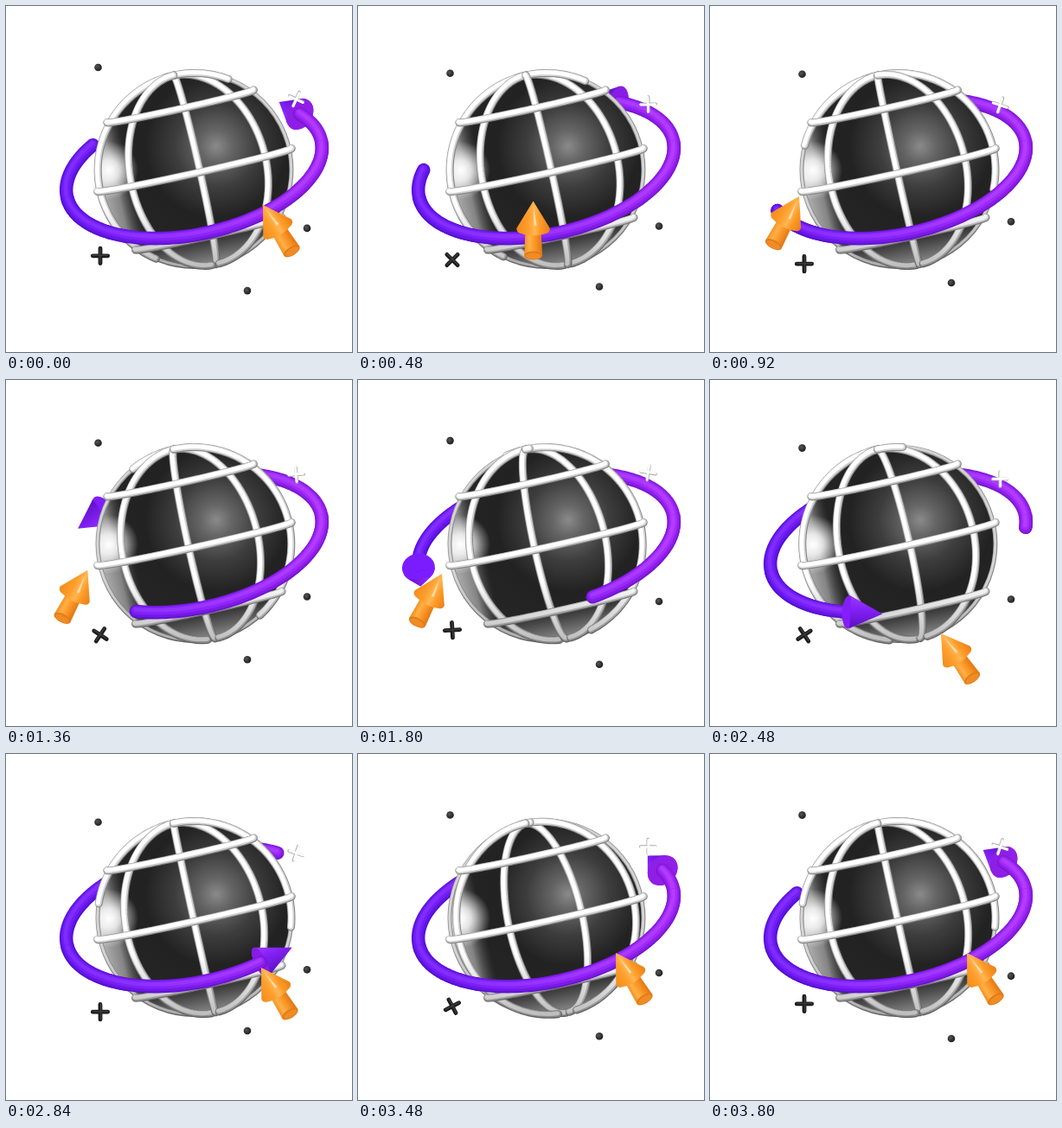
An HTML page with a canvas for the animation above (4 s loop, 400 by 400 pixels).

```html
<!DOCTYPE html>
<html lang="en">
<head>
<meta charset="utf-8">
<title>Spinning globe</title>
<style>
  html, body { margin: 0; width: 100%; height: 100%; overflow: hidden; background: #fff; }
  canvas { display: block; width: 400px; height: 400px; }
</style>
</head>
<body>
<canvas id="stage" width="400" height="400"></canvas>
<script>
const ctx = document.getElementById('stage').getContext('2d');
const { sin, cos, PI, hypot, atan2, abs } = Math;
const TAU = 2 * PI, RAD = PI / 180;
const LOOP = 4000, LAST = 3800, STEP = 40, CYCLE = 1920;
const CX = 218, CY = 189.5, R = 112;
const TILT = 12.5 * RAD, NOD = 2 * RAD;
const RING_X = 217.5, RING_Y = 188.3, RING = 150.5, SQUASH = 0.5, SPAN = 252;

// Smooth monotone interpolation through [time, value] keys
function track(keys) {
  const slope = i => (keys[i + 1][1] - keys[i][1]) / (keys[i + 1][0] - keys[i][0]);
  const tangent = i => {
    if (i === 0 || i === keys.length - 1) return 0;
    const a = slope(i - 1), b = slope(i);
    return a * b <= 0 ? 0 : 2 * a * b / (a + b);
  };
  return t => {
    let i = 0;
    while (i < keys.length - 2 && t > keys[i + 1][0]) i++;
    const [t0, v0] = keys[i], [t1, v1] = keys[i + 1], d = t1 - t0;
    const s = Math.min(1, (t - t0) / d), q = 1 - s;
    return v0 * (1 + 2 * s) * q * q + v1 * s * s * (3 - 2 * s)
      + d * s * q * (tangent(i) * q - tangent(i + 1) * s);
  };
}

const headAngle = track([[0, -28], [920, -85], [1800, -177], [2480, -241], [2840, -295], [3480, -378], [3800, -388]]);
const spin = track([[-1040, -96], [-360, -24], [-40, -0.7], [0, 3], [920, 89], [1800, 172.5], [2480, 231.5],
  [2840, 269.3], [3480, 336.5], [3800, 359.3], [3840, 363]]);
const cursorX = track([[0, 297], [920, 103], [1120, 94], [1800, 97], [2240, 190], [2480, 267], [2840, 295], [3480, 298], [3800, 297]]);
const cursorY = track([[0, 230], [920, 220], [1120, 219], [1800, 224], [2240, 304], [2480, 293], [2840, 247], [3480, 230], [3800, 230]]);
const cursorTurn = track([[0, -32], [920, 28], [1800, 27], [2240, -20], [2480, -35], [2840, -32], [3480, -32], [3800, -32]]);

// Tilted local offset to stage position
const place = (x, y, cx = CX, cy = CY) =>
  [cx + x * cos(TILT) + y * sin(TILT), cy - x * sin(TILT) + y * cos(TILT)];

function linear(x0, y0, x1, y1, stops) {
  const g = ctx.createLinearGradient(x0, y0, x1, y1);
  stops.forEach(([at, color]) => g.addColorStop(at, color));
  return g;
}

const across = (from, to, x0 = 62, x1 = 374) => linear(x0, 0, x1, 0, [[0, from], [1, to]]);
const fadeDown = (top, bottom) => linear(0, 75, 0, 305, [[0, top], [0.68, top], [1, bottom]]);

function glow(x, y, r, stops) {
  const g = ctx.createRadialGradient(x, y, 0, x, y, r);
  stops.forEach(([at, color]) => g.addColorStop(at, color));
  return g;
}

function polyline(points) {
  const path = new Path2D();
  points.forEach(p => path.lineTo(...p));
  return path;
}

// Each layer is [color, width, dx, dy]
function tube(path, layers) {
  for (const [color, width, dx, dy] of layers) {
    ctx.save();
    ctx.translate(dx, dy);
    ctx.strokeStyle = color;
    ctx.lineWidth = width;
    ctx.stroke(path);
    ctx.restore();
  }
}

function disc(x, y, rx, ry, turn, fill) {
  ctx.beginPath();
  ctx.ellipse(x, y, rx, ry, turn, 0, TAU);
  ctx.fillStyle = fill;
  ctx.fill();
}

const WIRE = [
  [fadeDown('#868686', '#5c5c5c'), 9, 0, 0],
  [fadeDown('#d2d2d2', '#888'), 7.4, -0.3, -0.4],
  [fadeDown('#fff', '#bbb'), 4.8, -0.8, -0.8]
];

function wire(radius, minDepth, pointAt, from, to) {
  let run = [];
  const flush = () => { if (run.length > 1) tube(polyline(run), WIRE); run = []; };
  for (let a = from; a <= to; a += 3) {
    const [lat, lon] = pointAt(a * RAD);
    const y = sin(lat), z = cos(lat) * cos(lon);
    if (z * cos(NOD) + y * sin(NOD) < minDepth) { flush(); continue; }
    run.push(place(radius * cos(lat) * sin(lon), -radius * (y * cos(NOD) - z * sin(NOD))));
  }
  flush();
}

function globe(t) {
  ctx.save();
  ctx.beginPath();
  ctx.arc(CX, CY, R, 0, TAU);
  ctx.clip();
  const fills = [
    glow(243, 162, 150, [[0, '#8a8a8a'], [0.12, '#666'], [0.32, '#3d3d3d'], [0.55, '#222'], [1, '#262626']]),
    linear(104, 194, 143, 185, [[0, '#b4b4b4'], [0.5, '#9a9a9ad0'], [1, '#5550']]),
    linear(235, 262, 243, 302, [[0, '#8880'], [1, '#999']]),
    glow(119, 190, 34, [[0, '#fff'], [0.35, '#fffc'], [1, '#fff0']])
  ];
  for (const fill of fills) {
    ctx.fillStyle = fill;
    ctx.fillRect(CX - R, CY - R, 2 * R, 2 * R);
  }
  ctx.restore();

  const rim = new Path2D();
  rim.arc(CX, CY, R, 0, TAU);
  tube(rim, [[fadeDown('#909090', '#666'), 5, 0, 0], [fadeDown('#d4d4d4', '#aaa'), 3, -0.2, -0.5]]);
  const turn = spin(t) * RAD;
  for (let i = 0; i < 8; i++) wire(R, 0, a => [a, turn + i * PI / 4], -90, 90);
  for (const lat of [-41, 0, 41]) wire(R + 3, -0.03, a => [lat * RAD, a], -120, 120);
}

const ringPoint = deg => place(RING * cos(deg * RAD), RING * SQUASH * sin(deg * RAD), RING_X, RING_Y);

function head(deg) {
  const a = deg * RAD, [x, y] = ringPoint(deg);
  const [tx, ty] = place(sin(a) * 43, -SQUASH * cos(a) * 43, x, y);
  const depth = -cos(a) * 0.866, turn = atan2(ty - y, tx - x), width = 19;
  const squash = Math.max(1.5, width * abs(depth));
  const length = hypot(tx - x, ty - y);
  disc(x, y, squash, width, turn, across('#7a1cff', '#9a22f0'));
  ctx.save();
  ctx.translate(x, y);
  ctx.rotate(turn);
  if (length > squash) {
    // Lines from the tip that touch the base ellipse
    const bx = squash * squash / length, by = width * Math.sqrt(1 - (squash / length) ** 2);
    ctx.fillStyle = linear(0, -width, 0, width, [[0, '#9a3aff'], [0.4, '#8420f5'], [1, '#5a0fc0']]);
    ctx.beginPath();
    ctx.moveTo(length, 0);
    ctx.lineTo(bx, by);
    ctx.lineTo(bx, -by);
    ctx.fill();
  }
  ctx.restore();
  if (depth < 0) disc(x, y, squash, width, turn, across('#6512d8', '#9420e8'));
}

function ring(t) {
  const start = headAngle(t), points = [];
  for (let d = 0; d <= SPAN; d += 2) points.push(ringPoint(start + d));
  const drawTube = () => tube(polyline(points), [
    [across('#4d0fd0', '#7d18d0'), 15.5, 0, 0],
    [across('#6014e6', '#931ee6'), 13, -0.2, -0.7],
    [across('#6f1cfa', '#a62cfa'), 9, -0.5, -1.6],
    [across('#7c2cff', '#b63cff'), 4.5, -0.8, -2.4]
  ]);
  const facing = cos(start * RAD) < 0;
  if (facing) drawTube();
  head(start);
  if (!facing) drawTube();
}

function frontRing(t) {
  ctx.save();
  ctx.beginPath();
  for (const [x, y] of [[-300, 0], [300, 0], [300, 300], [-300, 300]]) ctx.lineTo(...place(x, y, RING_X, RING_Y));
  ctx.clip();
  ring(t);
  ctx.restore();
}

function cursor(t) {
  ctx.save();
  ctx.translate(cursorX(t), cursorY(t));
  ctx.rotate(cursorTurn(t) * RAD);
  ctx.fillStyle = linear(-11, 0, 11, 0, [[0, '#f08a1c'], [0.3, '#ffb046'], [0.6, '#fa9526'], [1, '#dd7412']]);
  ctx.beginPath();
  ctx.moveTo(-9, 34);
  ctx.lineTo(9, 34);
  ctx.lineTo(10.5, 63);
  ctx.lineTo(-10.5, 63);
  ctx.fill();
  disc(0, 63, 10.5, 5, 0, '#e27c18');
  disc(0, 63.5, 8.5, 3.6, 0, '#f08c26');
  ctx.fillStyle = linear(-19, 0, 19, 0, [[0, '#f28c1c'], [0.35, '#ff9f2c'], [0.55, '#ffb654'], [0.7, '#ff9c28'], [1, '#e98018']]);
  ctx.beginPath();
  ctx.moveTo(0, 0);
  ctx.lineTo(19, 31);
  ctx.quadraticCurveTo(20, 35, 16, 37);
  ctx.quadraticCurveTo(0, 43, -16, 37);
  ctx.quadraticCurveTo(-20, 35, -19, 31);
  ctx.fill();
  ctx.fillStyle = '#ffdca8';
  ctx.beginPath();
  ctx.moveTo(0, 5);
  ctx.lineTo(4, 28);
  ctx.lineTo(1, 29);
  ctx.fill();
  ctx.restore();
}

function plus(x, y, turn, arm, layers) {
  const path = new Path2D(`M${-arm} 0H${arm}M0 ${-arm}V${arm}`);
  ctx.save();
  ctx.translate(x, y);
  ctx.rotate(turn * RAD);
  tube(path, layers);
  ctx.restore();
}

function dot(x, y) {
  disc(x, y, 4.3, 4.3, 0, glow(x - 1, y - 1, 5, [[0, '#555'], [1, '#222']]));
}

function draw(t) {
  const phase = t / CYCLE, wave = shift => cos(TAU * (phase + shift));
  ctx.clearRect(0, 0, 400, 400);
  ctx.lineCap = ctx.lineJoin = 'round';
  ring(t);
  globe(t);
  frontRing(t);

  dot(106.5, 74.7 - 4.8 * wave(0.11));
  dot(348, 253 + 4.2 * wave(-0.06));
  dot(279, 324.5 + 4.6 * wave(0));
  const half = phase * 2 % 1;
  plus(109, 293.5 - 4.7 * wave(0), 45 * (1 - cos(PI * half)), 8.7, [['#1c1c1c', 4.8, 0, 0], ['#3a3a3a', 1.5, -0.4, -0.6]]);
  const lead = phase - 0.81;
  plus(335.5, 111 - 4.2 * wave(0.11), 180 * lead - 14 * sin(2 * TAU * lead), 8.5,
    [['#aaa', 3.6, 0.2, 0.3], ['#fff', 2.8, -0.2, -0.3]]);
  cursor(t);
}

const begin = performance.now();
function tick() {
  const t = (performance.now() - begin) % LOOP;
  draw(Math.min(LAST, Math.floor(t / STEP) * STEP));
  requestAnimationFrame(tick);
}
tick();
</script>
</body>
</html>
```
